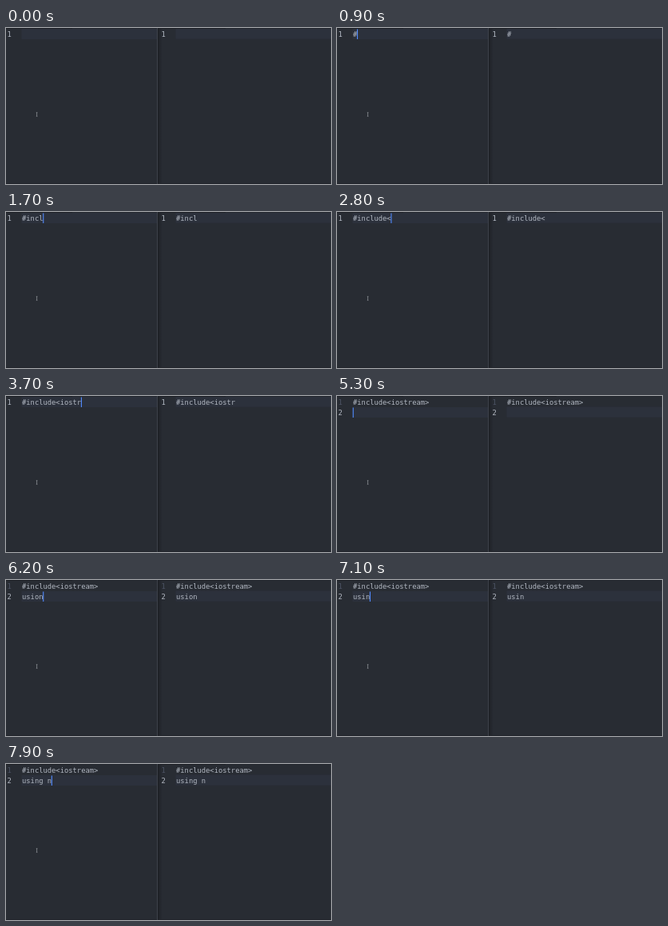
Write an HTML page that moves like this. It is 407 px wide and 195 px high and loops after 8 s.

```html
<!DOCTYPE html>
<html lang="en">
<head>
<meta charset="utf-8">
<style>
  html, body { margin: 0; width: 100%; height: 100%; overflow: hidden; background: #282c33; }
  svg { display: block; width: 407px; height: 195px; }
  text { font: 8.8px "DejaVu Sans Mono", monospace; fill: #b2b8c2; white-space: pre; }
  .row { fill: #2c313c; }
</style>
</head>
<body>
<svg viewBox="0 0 407 195">
  <defs>
    <linearGradient id="shade">
      <stop stop-color="#202329"/>
      <stop offset="1" stop-color="#282c33"/>
    </linearGradient>
  </defs>
  <rect width="407" height="195" fill="#282c33"/>
  <rect x="191" width="5" height="195" fill="url(#shade)"/>
  <g id="panes"></g>
  <path d="M0 .5H83M191 .5H275" stroke="#1d2026"/>
  <path d="M83 .5H190M275 .5H407" stroke="#23272e"/>
  <path d="M0 194.5H407" stroke="#22252b"/>
  <path d="M189.5 0V195" stroke="#3d424b"/>
  <path d="M190.5 0V195" stroke="#1d2026"/>
  <path d="M37.8 105.7h1.6M37.8 110.3h1.6M38.6 105.7v4.6" stroke="#9a9da2" stroke-width=".7" fill="none"/>
  <rect id="caret" width="1.1" height="12.5" fill="#528bff"/>
</svg>
<script>
const LOOP = 8000, CHAR = 5.298, LINE = 13;
const FIRST = '#include<iostream>';

// [time, characters on line 1, text on line 2 (null before it exists), delay of the right pane]
const edits = [
  [0, 0, null, 0], [800, 1, null, 100],
  [1300, 2, null, 100], [1400, 3, null, 100], [1500, 4, null, 100], [1600, 5, null, 100],
  [2200, 6, null, 100], [2300, 7, null, 100], [2400, 8, null, 100], [2800, 9, null, 0],
  [3100, 10, null, 100], [3300, 11, null, 100], [3400, 12, null, 100], [3500, 13, null, 100],
  [3600, 14, null, 100], [3800, 15, null, 0], [3900, 16, null, 0], [4200, 17, null, 0],
  [5000, 18, null, 100], [5300, 18, '', 0],
  [5600, 18, 'u', 0], [5700, 18, 'usi', 0], [5800, 18, 'usio', 0], [5900, 18, 'usion', 0],
  [6400, 18, '', 0], [6600, 18, 'u', 100], [6700, 18, 'us', 100], [6800, 18, 'usi', 100],
  [7100, 18, 'usin', 0], [7400, 18, 'using', 100], [7600, 18, 'using ', 0],
  [7800, 18, 'using n', 100]
];

const panesRoot = document.getElementById('panes');
const caret = document.getElementById('caret');

function add(tag, attrs, text = '') {
  const el = document.createElementNS('http://www.w3.org/2000/svg', tag);
  for (const k in attrs) el.setAttribute(k, attrs[k]);
  el.textContent = text;
  panesRoot.append(el);
  return el;
}

function makePane(left, width, dy) {
  const row = add('rect', { class: 'row', x: left + 19.5, width, height: LINE });
  const numbers = [0, 1].map(i => add('text', { x: left + 1.6, y: 11.2 + dy + i * LINE }, i + 1));
  const lines = [0, 1].map(i => add('text', { x: left + 20, y: 11.2 + dy + i * LINE }));
  return ([, count, second]) => {
    const active = second === null ? 0 : 1;
    row.setAttribute('y', 1 + dy + active * LINE);
    numbers[0].style.fill = active ? '#4b5263' : '';
    numbers[1].style.display = active ? '' : 'none';
    lines[0].textContent = FIRST.slice(0, count);
    lines[1].textContent = second || '';
  };
}

const drawLeft = makePane(0, 169.5, 0);
const drawRight = makePane(193, 194.5, -0.4);

function draw(t) {
  const state = edits.findLast(e => e[0] <= t);
  drawLeft(state);
  drawRight(edits.findLast(e => e[0] + e[3] <= t) || edits[0]);
  const [, count, second] = state;
  const column = second === null ? count : second.length;
  caret.setAttribute('x', 19.7 + column * CHAR);
  caret.setAttribute('y', second === null ? 1.5 : 1.5 + LINE);
  const hidden = t < 400 || (t >= 4700 && t < 5000);
  caret.style.display = hidden ? 'none' : '';
}

function frame(now) {
  draw(now % LOOP);
  requestAnimationFrame(frame);
}
draw(0);
requestAnimationFrame(frame);
</script>
</body>
</html>
```
